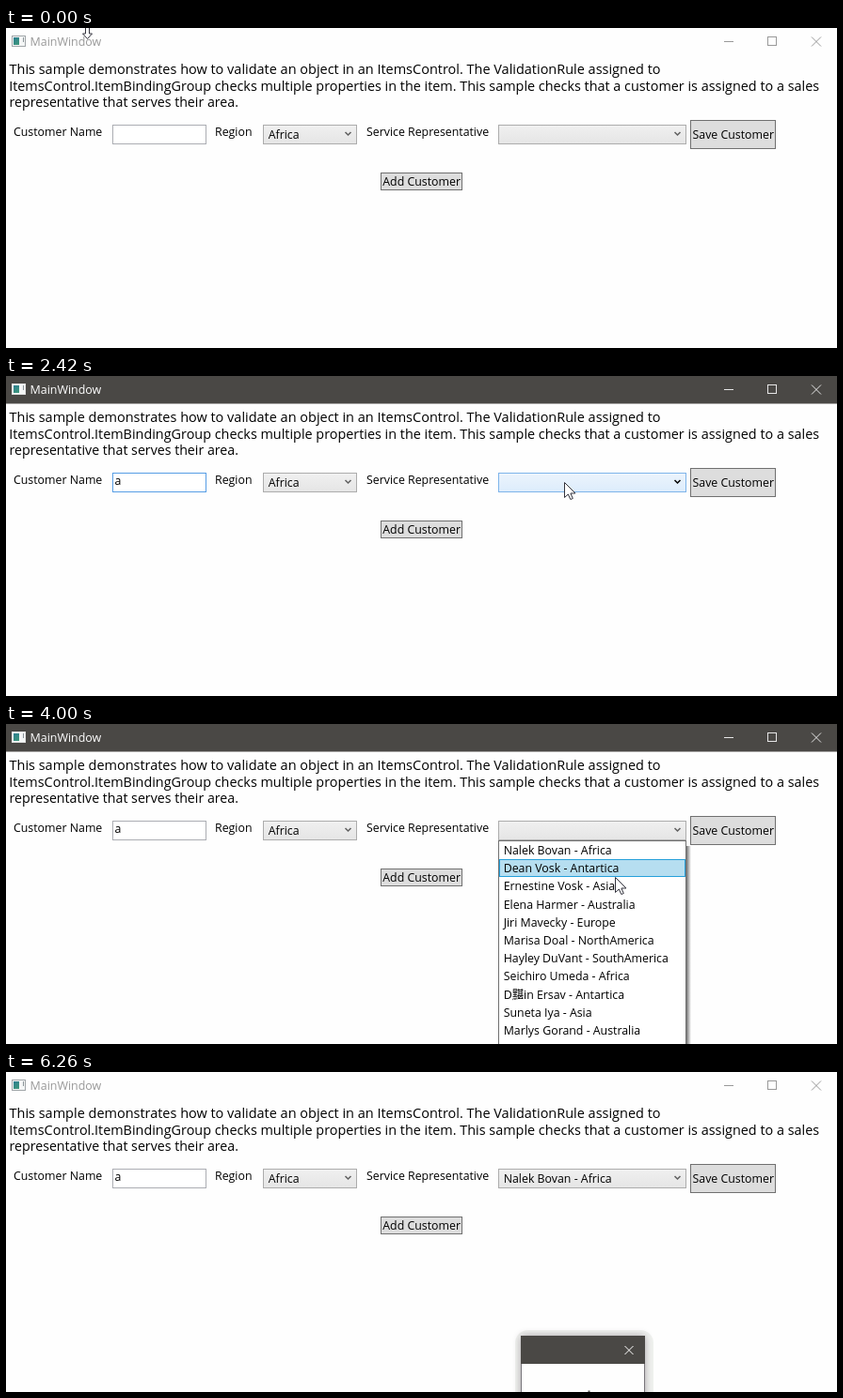
An HTML page with a canvas that plays this animation: 883 px wide and 341 px high, repeating every 8 s.

```html
<!DOCTYPE html>
<html lang="en">
<head>
<meta charset="utf-8">
<title>MainWindow</title>
<style>
  html, body { margin: 0; width: 100%; height: 100%; overflow: hidden; background: #fefefe; }
  canvas { display: block; }
</style>
</head>
<body>
<canvas id="stage" width="883" height="341"></canvas>
<script>
const ctx = document.getElementById('stage').getContext('2d');
const W = 883, H = 341, LOOP = 8000, TICK = 1000 / 12;
const FONT = '"Open Sans", "Noto Sans CJK SC", "Noto Sans", sans-serif';
const ROW = 19.2, LIST_TOP = 125;

const people = [
  'Nalek Bovan - Africa', 'Dean Vosk - Antartica', 'Ernestine Vosk - Asia',
  'Elena Harmer - Australia', 'Jiri Mavecky - Europe', 'Marisa Doal - NorthAmerica',
  'Hayley DuVant - SouthAmerica', 'Seichiro Umeda - Africa', 'D黮in Ersav - Antartica',
  'Suneta Iya - Asia', 'Marlys Gorand - Australia'
];

// Event times in ticks of 1/12 s
const at = { focus: 14, type: 22, hoverRep: 25, open: 30, pick: 58, hoverSave: 62, press: 66, dialog: 68 };

// Pointer path: tick, x, y
const path = [
  [0, 86, 0], [1, 88, 8], [5, 108, 52], [9, 138, 96], [11, 146, 104], [12, 150, 107],
  [15, 160, 107], [18, 262, 101], [20, 321, 97], [23, 440, 101], [26, 574, 110],
  [29, 593, 113], [31, 590, 115], [35, 585, 127], [38, 598, 136], [42, 618, 148],
  [48, 647, 163], [49, 650, 160], [51, 662, 141], [53, 669, 133], [58, 670, 132],
  [60, 724, 112], [62, 789, 100], [64, 794, 99], [68, 794, 100], [71, 708, 232], [74, 632, 345]
];

function pointerAt(k) {
  const i = path.findIndex(p => p[0] > k);
  if (i < 0) return path[path.length - 1].slice(1);
  const a = path[i - 1], b = path[i], u = (k - a[0]) / (b[0] - a[0]);
  return [a[1] + (b[1] - a[1]) * u, a[2] + (b[2] - a[2]) * u];
}

function text(s, x, y, size = 12.35, color = '#000') {
  ctx.font = size + 'px ' + FONT;
  ctx.fillStyle = color;
  ctx.fillText(s, x, y);
}

// Filled box whose 1px border lies inside the given rectangle
function box(x, y, w, h, fill, border) {
  ctx.fillStyle = fill;
  ctx.fillRect(x, y, w, h);
  ctx.strokeStyle = border;
  ctx.lineWidth = 1;
  ctx.strokeRect(x + .5, y + .5, w - 1, h - 1);
}

function line(points, color, width = 1) {
  ctx.beginPath();
  points.forEach(([x, y]) => ctx.lineTo(x, y));
  ctx.strokeStyle = color;
  ctx.lineWidth = width;
  ctx.stroke();
}

function cross(x, y, r, color) {
  line([[x - r, y - r], [x + r, y + r]], color);
  line([[x + r, y - r], [x - r, y + r]], color);
}

function shape(points, x, y) {
  ctx.beginPath();
  points.forEach(([dx, dy]) => ctx.lineTo(x + dx, y + dy));
  ctx.closePath();
  ctx.fillStyle = '#fff';
  ctx.fill();
  ctx.strokeStyle = '#33333d';
  ctx.lineWidth = 1;
  ctx.stroke();
}

function titleBar(active) {
  if (active) {
    ctx.fillStyle = '#4a4845';
    ctx.fillRect(0, 0, W, 29.5);
  }
  const ink = active ? '#e6e6e6' : '#999';
  box(6, 8, 15, 12, '#f4f6f6', active ? '#e4e4e4' : '#a0a5a8');
  const g = ctx.createLinearGradient(8, 10, 14, 19);
  g.addColorStop(0, '#2f7f92');
  g.addColorStop(1, '#3f9a78');
  ctx.fillStyle = g;
  ctx.fillRect(8, 10, 6, 8);
  ctx.fillStyle = '#8a9398';
  ctx.fillRect(18, 10, 1, 5);
  text('MainWindow', 25.5, 18.5, 12.45, active ? '#fff' : ink);
  line([[763, 14.5], [773, 14.5]], ink);
  ctx.strokeRect(809.5, 9.5, 9, 9);
  cross(861, 14.5, 5, ink);
}

function combo(x, w, label, hover) {
  const g = ctx.createLinearGradient(0, 103, 0, 124);
  g.addColorStop(0, hover ? '#ecf4fc' : '#f0f0f0');
  g.addColorStop(1, hover ? '#dcecfc' : '#e5e5e5');
  box(x, 103, w, 21, g, hover ? '#7eb4ea' : '#acacac');
  const c = x + w - 9.5;
  line([[c - 3, 111], [c, 114], [c + 3, 111]], hover ? '#000' : '#606060', 1.5);
  text(label, x + 5.7, 118);
}

function form(k) {
  text('This sample demonstrates how to validate an object in an ItemsControl. The ValidationRule assigned to', 3.5, 49, 14.47);
  text('ItemsControl.ItemBindingGroup checks multiple properties in the item. This sample checks that a customer is assigned to a sales', 3.2, 66.5, 14.4);
  text('representative that serves their area.', 3.5, 84, 14.2);

  text('Customer Name', 8, 115);
  text('Region', 222, 115);
  text('Service Representative', 383, 115);

  const focused = k >= at.focus && k < at.open;
  const typed = k >= at.type;
  box(113, 103, 100, 21, '#fff', focused ? '#569de5' : '#abadb3');
  if (typed) text('a', 115.5, 116);
  const blink = (k - (typed ? at.type : at.focus)) * TICK % 1060 < 540;
  if (focused && blink) {
    ctx.fillStyle = '#000';
    ctx.fillRect(typed ? 122 : 114.5, 105, 1.5, 15);
  }

  combo(273, 100, 'Africa', k >= 18 && k < 20);
  combo(523, 200, k >= at.pick ? people[0] : '', k >= at.hoverRep && k < at.open);

  const hover = k >= at.hoverSave && k < at.dialog, down = hover && k >= at.press;
  box(727, 98, 91, 31, down ? '#c4e5f6' : hover ? '#bee6fd' : '#ddd',
    down ? '#2c628b' : hover ? '#3c7fb1' : '#707070');
  text('Save Customer', 729.5, 118);
  box(398, 154, 87, 19, '#ddd', '#707070');
  text('Add Customer', 400.3, 168);
}

function list(k, y) {
  if (k < at.open || k >= at.pick) return;
  const shown = Math.min(1, (k - at.open + 1) / 3);
  ctx.save();
  ctx.beginPath();
  ctx.rect(515, 124, 220, (H - 124) * shown);
  ctx.clip();
  ctx.translate(0, (shown - 1) * (H - 124));
  const g = ctx.createLinearGradient(723, 0, 728, 0);
  g.addColorStop(0, 'rgba(0,0,0,.55)');
  g.addColorStop(1, 'rgba(0,0,0,0)');
  ctx.fillStyle = g;
  ctx.fillRect(723, 130, 5, 220);
  box(523, 124, 200, 230, '#fff', '#707070');
  const over = shown < 1 ? -1 : Math.floor((y - LIST_TOP) / ROW);
  if (over >= 0) box(524, LIST_TOP + Math.round(over * ROW), 198, 19, '#b6def0', '#26a0da');
  people.forEach((p, i) => text(p, 528.7, 139 + i * ROW));
  ctx.restore();
}

function dialog(k) {
  const u = Math.min(1, (k - at.dialog) / 3);
  if (u <= 0) return;
  const s = .9 + .1 * u;
  ctx.save();
  ctx.globalAlpha = u;
  ctx.translate(613, 350);
  ctx.scale(s, s);
  ctx.translate(-613, -350);
  ctx.beginPath();
  ctx.roundRect(541, 275, 147, 150, 14);
  ctx.fillStyle = '#f0f2ef';
  ctx.fill();
  ctx.shadowColor = 'rgba(60,40,60,.4)';
  ctx.shadowBlur = 8;
  ctx.fillStyle = '#fff';
  ctx.fillRect(547, 281, 132, 140);
  ctx.shadowColor = 'transparent';
  box(547, 281, 132, 141, '#fefefe', '#77747a');
  ctx.fillStyle = '#4a4845';
  ctx.fillRect(547, 281, 132, 30);
  cross(662, 296.5, 4.5, '#fff');
  ctx.fillStyle = '#555';
  ctx.fillRect(618.5, 339.5, 2, 2);
  ctx.restore();
}

function pointer(k, x, y) {
  if (k >= 74) return;
  if (k < 1) {
    shape([[-2, -4], [2, -4], [2, 5.5], [5, 5.5], [0, 11], [-5, 5.5], [-2, 5.5]], x + .5, y + .5);
  } else if (x > 113 && x < 213 && y > 102 && y < 124) {
    line([[x - 3, y - 8], [x, y - 7], [x + 3, y - 8]], '#222');
    line([[x, y - 7], [x, y + 7]], '#222');
    line([[x - 3, y + 8], [x, y + 7], [x + 3, y + 8]], '#222');
  } else {
    shape([[0, 0], [0, 16], [3.8, 12.5], [6.3, 18], [8.8, 17], [6.4, 11.5], [11.5, 11.5]], x + .5, y + .5);
  }
}

function draw(now) {
  const k = Math.floor((now % LOOP + 4) / TICK);
  const [x, y] = pointerAt(k);
  ctx.fillStyle = '#fefefe';
  ctx.fillRect(0, 0, W, H);
  titleBar(k >= at.focus && k < at.dialog);
  form(k);
  list(k, y);
  dialog(k);
  pointer(k, x, y);
}

const start = performance.now();
function loop() {
  draw(performance.now() - start);
  requestAnimationFrame(loop);
}
loop();
</script>
</body>
</html>
```
